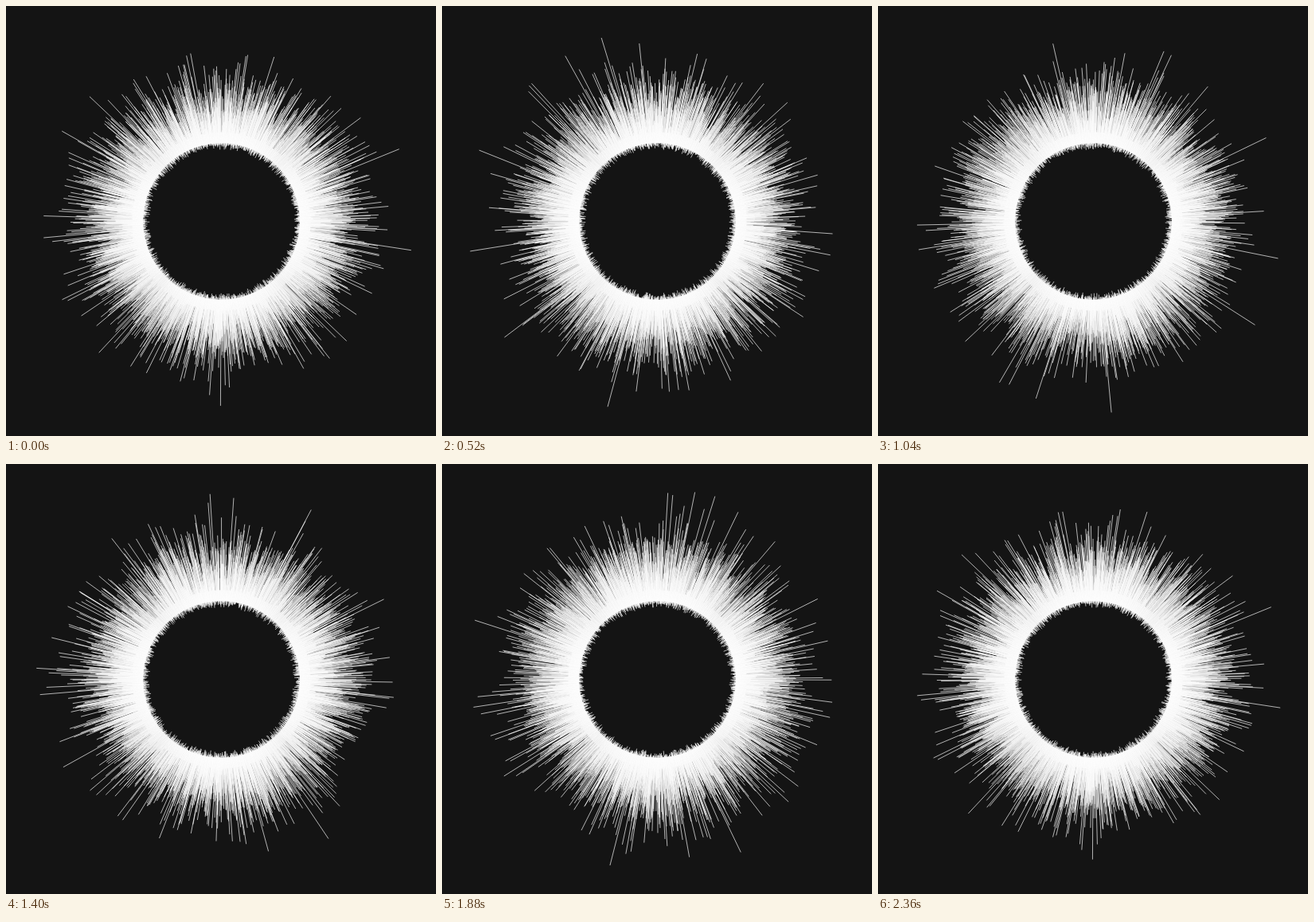
An HTML page with a canvas for the animation above (2400 ms loop, 540 by 540 pixels).

```html
<!DOCTYPE html>
<html lang="en">
<head>
<meta charset="utf-8">
<title>Corona</title>
<style>
html, body { margin: 0; width: 100%; height: 100%; overflow: hidden; background: #141414; }
canvas { display: block; }
</style>
</head>
<body>
<canvas id="stage" width="540" height="540"></canvas>
<script>
const ctx = document.getElementById('stage').getContext('2d');
const SIZE = 540, CENTER = 270.5, LOOP = 2400, STEP = 40;
const RING = 98.5, MIN_REACH = 112, MEAN_REACH = 148, MAX_REACH = 241;
const SPREAD = 25, FRINGE = 3.6, RAY_COUNT = 3000, TAU = Math.PI * 2;

let seed = 20417;
function random() {
  seed = (seed + 0x6D2B79F5) | 0;
  let n = Math.imul(seed ^ (seed >>> 15), 1 | seed);
  n = (n + Math.imul(n ^ (n >>> 7), 61 | n)) ^ n;
  return ((n ^ (n >>> 14)) >>> 0) / 4294967296;
}

function makeHarmonic(rate, weight) {
  const size = weight * Math.sqrt(-2 * Math.log(1 - random()));
  const shift = random() * TAU;
  return phase => size * Math.cos(rate * phase + shift);
}

// A looping, smooth signal with a normal distribution and unit variance.
function makeWave() {
  const slow = makeHarmonic(1, 0.8), fast = makeHarmonic(2, 0.6);
  return phase => slow(phase) + fast(phase);
}

const rays = Array.from({ length: RAY_COUNT }, (_, i) => {
  const angle = (i + random()) / RAY_COUNT * TAU;
  return { x: Math.cos(angle), y: Math.sin(angle), outer: makeWave(), inner: makeWave() };
});

// Strong peaks are stretched further, so a few flares stand out.
function outerRadius(level) {
  const flare = 3.5 * Math.max(0, level - 1) ** 2;
  const radius = MEAN_REACH + SPREAD * level + flare;
  return Math.min(MAX_REACH, Math.max(MIN_REACH, radius));
}

function innerRadius(level) {
  return RING - FRINGE * Math.min(2.3, Math.max(0, level));
}

function draw(time) {
  const phase = time / LOOP * TAU;
  ctx.fillStyle = '#141414';
  ctx.fillRect(0, 0, SIZE, SIZE);
  ctx.strokeStyle = 'rgba(255,255,255,0.85)';
  ctx.lineWidth = 0.8;
  for (const { x, y, outer, inner } of rays) {
    const from = innerRadius(inner(phase)), to = outerRadius(outer(phase));
    ctx.beginPath();
    ctx.moveTo(CENTER + x * from, CENTER + y * from);
    ctx.lineTo(CENTER + x * to, CENTER + y * to);
    ctx.stroke();
  }
}

let shown = -1;
function tick() {
  const time = Math.floor(performance.now() % LOOP / STEP) * STEP;
  if (time !== shown) draw(shown = time);
  requestAnimationFrame(tick);
}
tick();
</script>
</body>
</html>
```
